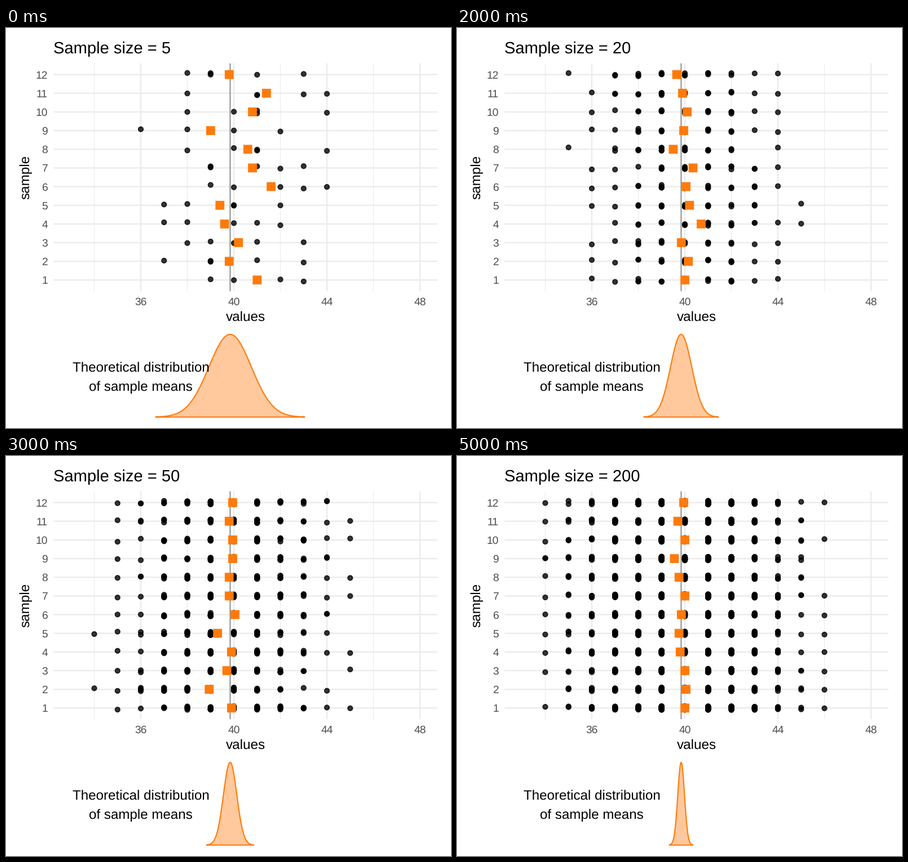
Recreate the animation shown at these times as a matplotlib script. Size 789x710 px, loop 6 s.

```python
import math

import numpy as np
import matplotlib.pyplot as plt
from matplotlib.animation import FuncAnimation
from matplotlib.collections import EllipseCollection, PatchCollection
from matplotlib.patches import Polygon, Rectangle

W, H, DPI = 789, 710, 100
PT = 72 / DPI                      # points per pixel
LEFT, RIGHT, TOP, BOTTOM = 84.3, 764.9, 62.7, 467.2
MU, SD = 39.84, 2.044
ORANGE, GRID, TICK = "#ff7a0a", "#ebebeb", "#4d4d4d"
ROWS = range(1, 13)

# Sample size -> mean of each sample, from row 1 up.
MEANS = {
    5: [41, 39.8, 40.2, 39.6, 39.4, 41.6, 40.8, 40.6, 39, 40.8, 41.4, 39.8],
    10: [39.8, 40.6, 39.4, 40.1, 39.4, 40, 39.8, 38.5, 41.2, 39.2, 41.4, 40.1],
    20: [40, 40.15, 39.85, 40.7, 40.2, 40.05, 40.35, 39.5, 39.95, 40.1, 39.9,
         39.65],
    50: [39.9, 38.94, 39.7, 39.9, 39.3, 40.05, 39.8, 39.8, 39.95, 39.95, 39.8,
         39.95],
    100: [39.9, 40, 39.7, 39.8, 40.1, 40, 39.95, 39.4, 39.9, 40, 39.7, 39.8],
    200: [40, 40.05, 40, 39.8, 39.75, 39.85, 40, 39.75, 39.55, 40, 39.7, 39.95],
}

Z = np.linspace(-4, 4, 401)
CDF = [0.5 + 0.5 * math.erf(z / math.sqrt(2)) for z in Z]

plt.rcParams.update({"font.family": "Liberation Sans", "text.hinting": "none"})
fig = plt.figure(figsize=(W / DPI, H / DPI), dpi=DPI, facecolor="white")
ax = fig.add_axes([0, 0, 1, 1])
ax.set(xlim=(0, W), ylim=(H, 0))
ax.axis("off")


def px(value):
    return 404 + (np.asarray(value) - 40) * 41.25


def py(row):
    return 447.3 - (np.asarray(row) - 1) * 33.15


def label(x, y, text, size, ha="center", color="black", **kw):
    return ax.text(x, y, text, fontsize=size * PT, ha=ha, va="baseline",
                   color=color, zorder=6, **kw)


def line(xs, ys, width, color, z=0):
    ax.plot(xs, ys, lw=width * PT, color=color, zorder=z,
            solid_capstyle="butt", snap=False)


def backdrop():
    for v in range(34, 49, 2):
        major = v % 4 == 0
        line([px(v)] * 2, [TOP, BOTTOM], 2.3 if major else 1.15, GRID)
        if major:
            label(px(v), 492, str(v), 19.3, color=TICK)
    for r in ROWS:
        line([LEFT, RIGHT], [py(r)] * 2, 2.3, GRID)
        label(74, py(r) + 7, str(r), 19.3, "right", TICK)
    line([px(MU)] * 2, [TOP, BOTTOM], 2.1, "#8f9393", 1)
    label((LEFT + RIGHT) / 2, 519.5, "values", 24.2)
    label(41.7, (TOP + BOTTOM) / 2, "sample", 24.2, rotation=90,
          rotation_mode="anchor")
    label(px(36), 609.5, "Theoretical distribution", 24.1)
    label(px(36), 644, "of sample means", 24.1)


def draw_sample(rng, n, mean):
    """Whole values spread evenly over a bell curve around the mean."""
    share = (np.arange(n) + rng.uniform(0.2, 0.8, n)) / n
    z = np.interp(share, CDF, Z)
    return np.round(mean + SD * (z - z.mean()))


def dots(n, means):
    rng = np.random.default_rng(n)
    values = np.concatenate([draw_sample(rng, n, m) for m in means])
    rows = np.repeat(ROWS, n) + rng.uniform(-0.1, 0.1, values.size)
    size = np.full(values.size, 8.7)
    return EllipseCollection(size, size, np.zeros(values.size), units="x",
                             offsets=np.column_stack([px(values), py(rows)]),
                             offset_transform=ax.transData,
                             facecolor=(0, 0, 0, 0.8), edgecolor=(0, 0, 0, 0.8),
                             linewidth=1.5 * PT, zorder=2)


def squares(means, side=15.8):
    boxes = [Rectangle((px(m) - side / 2, py(r) - side / 2), side, side)
             for r, m in zip(ROWS, means)]
    return PatchCollection(boxes, facecolor=ORANGE, edgecolor="none",
                           snap=False, zorder=3)


def bell(n, base=690.6, height=146.8):
    z = np.linspace(-3.5, 3.5, 241)
    x = px(MU + z * SD / math.sqrt(n))
    y = base - height * np.exp(-z ** 2 / 2)
    pts = [(x[0], base), *zip(x, y), (x[-1], base)]
    return Polygon(pts, closed=True, facecolor=(1, 0.478, 0.04, 0.4),
                   edgecolor=ORANGE, lw=2.1 * PT, joinstyle="round", zorder=2)


def build(n, means):
    parts = [dots(n, means), squares(means)]
    for p in parts:
        ax.add_collection(p, autolim=False)
    parts.append(ax.add_patch(bell(n)))
    parts.append(label(84, 45.3, f"Sample size = {n}", 29.1, "left"))
    return parts


backdrop()
groups = [build(n, means) for n, means in MEANS.items()]


def show(i):
    for k, group in enumerate(groups):
        for part in group:
            part.set_visible(k == i)
    return groups[i]


anim = FuncAnimation(fig, show, frames=len(groups), interval=1000,
                     init_func=lambda: show(0), repeat=True, repeat_delay=0,
                     blit=False)
plt.show()
```
